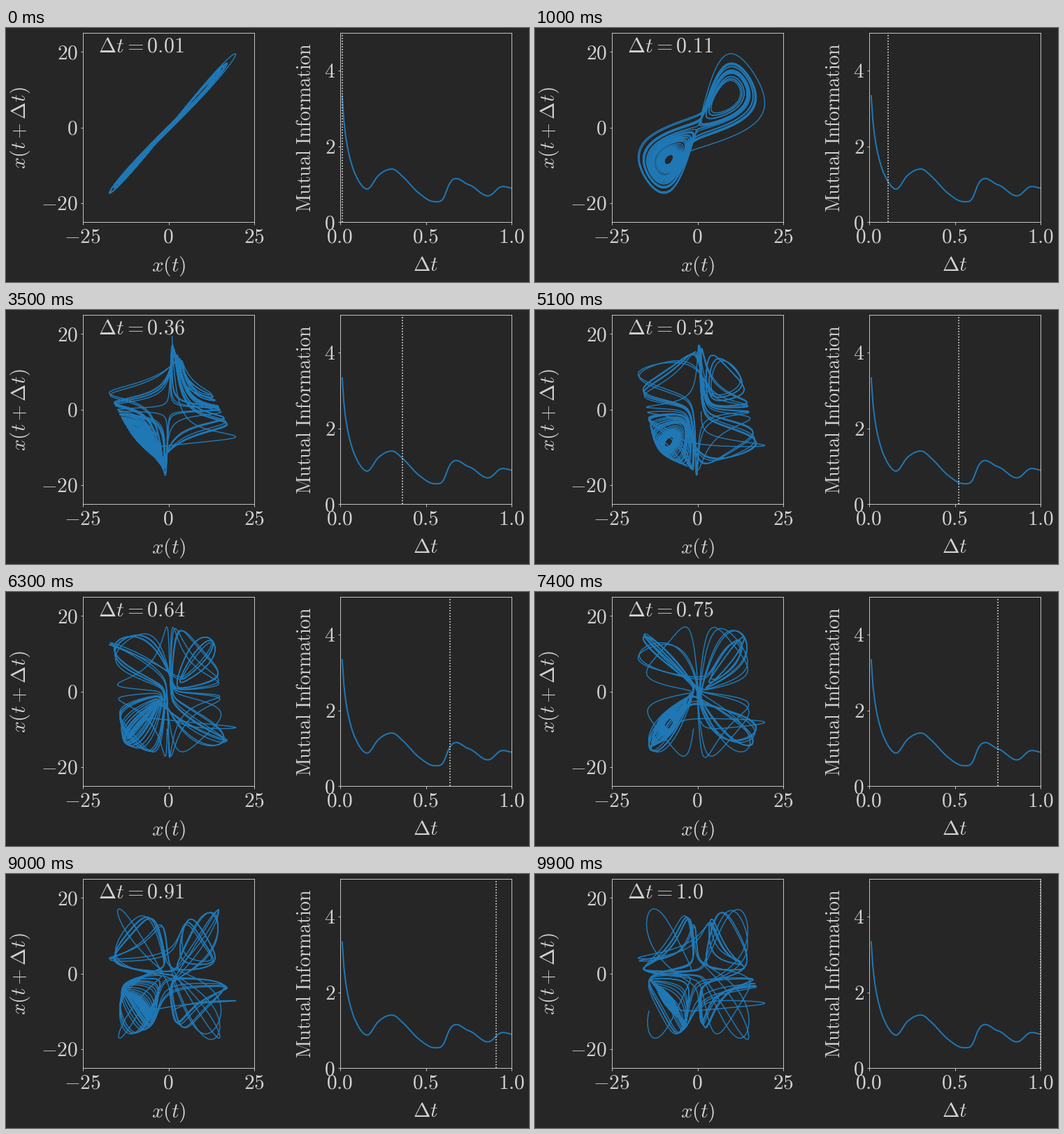
A matplotlib script that plays this animation: 748 px wide and 364 px high, repeating every 10000 ms.

```python
import matplotlib.pyplot as plt
import numpy as np
from matplotlib.animation import FuncAnimation

W, H, DPI = 748, 364, 100
PX = 72 / DPI  # points per pixel
TOP, WIDTH, HEIGHT = 7.2, 245.08, 271.2
BG, EDGE, INK, BLUE = "#262626", "#e6e6e6", "#d2d2d2", "#1f77b4"
STEP, COUNT = 0.01, 4000
TEXT = 29.4

plt.rcParams.update({"mathtext.fontset": "cm", "text.color": INK})


def lorenz(state, sigma=10.0, rho=28.0, beta=8 / 3):
    x, y, z = state
    return np.array([sigma * (y - x), x * (rho - z) - y, x * y - beta * z])


def trajectory():
    """x(t) of the Lorenz system, integrated with fixed-step RK4."""
    s, h = np.ones(3), STEP
    xs = np.empty(COUNT)
    for i in range(COUNT):
        xs[i] = s[0]
        k1 = lorenz(s)
        k2 = lorenz(s + h / 2 * k1)
        k3 = lorenz(s + h / 2 * k2)
        k4 = lorenz(s + h * k3)
        s = s + h / 6 * (k1 + 2 * k2 + 2 * k3 + k4)
    return xs


def smooth(x, px, py):
    """Cubic Hermite curve through a few key points."""
    slope = np.gradient(py, px)
    i = np.clip(np.searchsorted(px, x, side="right") - 1, 0, len(px) - 2)
    h = px[i + 1] - px[i]
    u = (x - px[i]) / h
    rise = py[i + 1] - py[i]
    a, b = slope[i] * h - rise, rise - slope[i + 1] * h
    return py[i] + u * rise + u * (1 - u) * ((1 - u) * a + u * b)


def mutual_information(lag):
    """Logarithmic decay, then humps through the turning points."""
    decay = 3.34 - 0.67 * np.log2(lag)
    px = np.array([8, 11, 15.5, 22, 27, 31, 36, 46, 55, 60, 63.5, 75, 87, 93.5, 100])
    py = np.array([1.33, 1.06, 0.875, 1.23, 1.38, 1.4, 1.22, 0.76,
                   0.545, 0.63, 1.01, 0.99, 0.705, 0.935, 0.9])
    return np.where(lag < 8, decay, smooth(lag, px, py))


fig = plt.figure(figsize=(W / DPI, H / DPI), dpi=DPI, facecolor=BG)


def label(x, y, text, size=TEXT, ha="center", rotation=0):
    fig.text(x / W, 1 - y / H, f"${text}$", fontsize=size * PX, ha=ha,
             va="baseline", rotation=rotation, rotation_mode="anchor")


def panel(left, xlim, ylim, xticks, yticks):
    bottom = TOP + HEIGHT
    ax = fig.add_axes([left / W, 1 - bottom / H, WIDTH / W, HEIGHT / H],
                      facecolor=BG)
    ax.set(xlim=xlim, ylim=ylim, xticks=xticks, yticks=yticks)
    ax.tick_params(length=3.5 * PX, width=0.8 * PX, color=EDGE,
                   labelbottom=False, labelleft=False)
    for spine in ax.spines.values():
        spine.set(color=EDGE, linewidth=0.8 * PX)
    for v in xticks:
        label(left - 0.8 + WIDTH * (v - xlim[0]) / np.ptp(xlim), 307, v)
    for v in yticks:
        label(left - 7.5, bottom + 9.7 - HEIGHT * (v - ylim[0]) / np.ptp(ylim),
              v, ha="right")
    return ax


phase = panel(110.2, (-25, 25), (-25, 25), (-25, 0, 25), (-20, 0, 20))
info = panel(478.4, (0, 1), (0, 5), (0.0, 0.5, 1.0), (0, 2, 4))

label(232.3, 348.5, "x(t)")
label(600, 348.5, r"\Delta t")
label(28, 143, r"x(t+\Delta t)", rotation=90)
label(436, 142.5, r"\mathrm{Mutual\ Information}", size=27.9, rotation=90)

xs = trajectory()
curve, = phase.plot([], [], color=BLUE, lw=1.5 * PX)
caption = phase.text(-20.6, 20, "", fontsize=30.1 * PX, va="baseline", zorder=5)

lags = np.arange(1, 101)
info.plot(lags * STEP, mutual_information(lags), color=BLUE, lw=2 * PX)
marker = info.axvline(STEP, color="white", ls=":", lw=1.5 * PX)


def draw(i):
    lag = i + 1
    dt = round(lag * STEP, 2)
    curve.set_data(xs[:-lag], xs[lag:])
    caption.set_text(rf"$\Delta t = {dt}$")
    marker.set_xdata([dt, dt])
    return curve, caption, marker


anim = FuncAnimation(fig, draw, frames=100, interval=100, repeat=True,
                     init_func=lambda: draw(0), blit=False)
plt.show()
```
